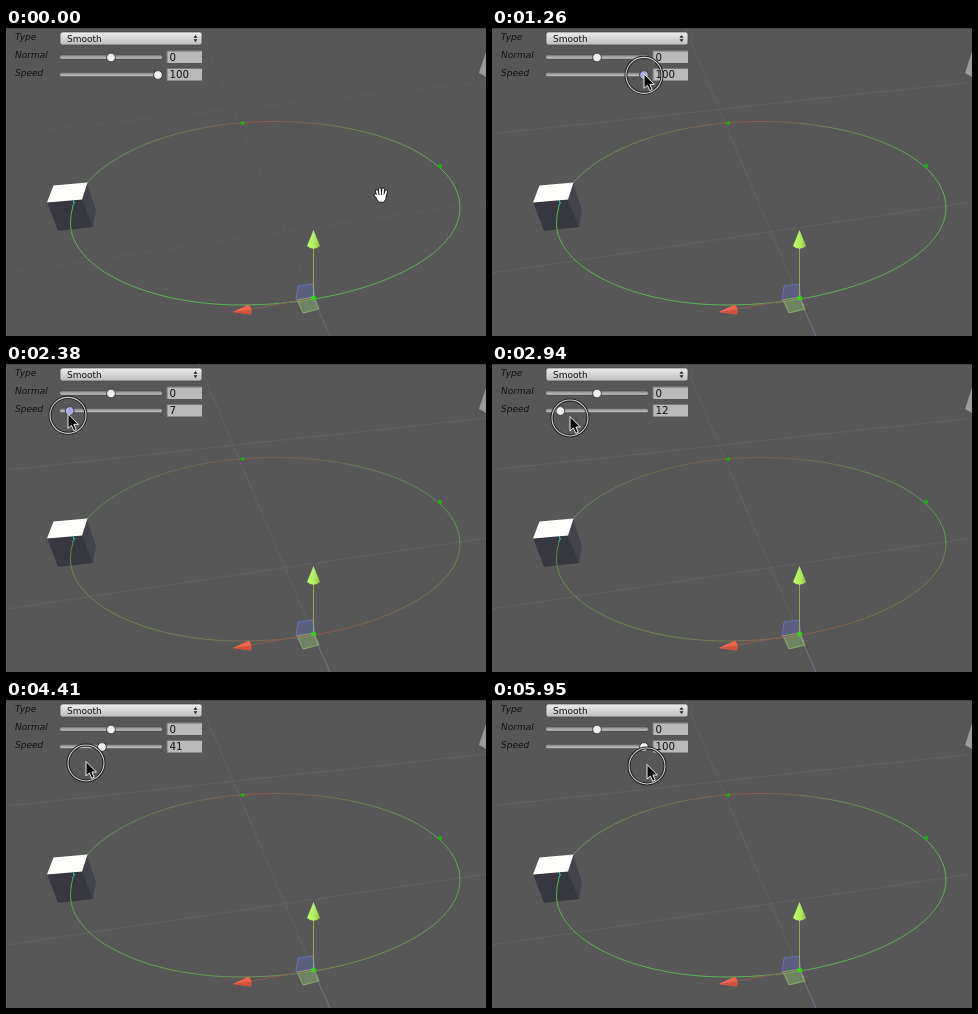
An HTML page for the animation above (6090 ms loop, 480 by 308 pixels).

```html
<!DOCTYPE html>
<html lang="en">
<head>
<meta charset="utf-8">
<title>Spline speed</title>
<style>
html, body { margin: 0; width: 100%; height: 100%; overflow: hidden; background: #575757; }
svg { display: block; width: 480px; height: 308px; }
text { font: 10.3px "DejaVu Sans", sans-serif; fill: #111; }
.label text { font-size: 9px; font-style: italic; }
.menu { font-size: 9px; }
</style>
</head>
<body>
<svg viewBox="0 0 480 308" fill="none">
  <defs>
    <linearGradient id="top" gradientUnits="userSpaceOnUse" x1="64" y1="0" x2="454" y2="0">
      <stop offset="0" stop-color="#62a85a"/>
      <stop offset=".18" stop-color="#698a58"/>
      <stop offset=".33" stop-color="#786b52"/>
      <stop offset=".45" stop-color="#8f5a4e"/>
      <stop offset=".6" stop-color="#82664f"/>
      <stop offset=".72" stop-color="#6f8653"/>
      <stop offset=".9" stop-color="#66a456"/>
      <stop offset="1" stop-color="#64b058"/>
    </linearGradient>
    <linearGradient id="bottom" gradientUnits="userSpaceOnUse" x1="64" y1="0" x2="454" y2="0">
      <stop offset="0"/><stop offset=".3"/><stop offset=".5"/>
      <stop offset=".64"/><stop offset=".78"/><stop offset="1"/>
    </linearGradient>
    <linearGradient id="menu" x2="0" y2="1">
      <stop stop-color="#eee"/><stop offset="1" stop-color="#bcbcbc"/>
    </linearGradient>
    <linearGradient id="groove" x2="0" y2="1">
      <stop stop-color="#777"/><stop offset="1" stop-color="#d0d0d0"/>
    </linearGradient>
    <linearGradient id="cone">
      <stop stop-color="#c4fa78"/><stop offset=".5" stop-color="#b4f062"/><stop offset="1" stop-color="#8fc842"/>
    </linearGradient>
    <g id="track">
      <rect x="53.5" y="-2.3" width="103" height="4.4" rx="2.2" fill="url(#groove)" stroke="#484848" stroke-width=".6"/>
      <path d="M161 -6h35v12h-35z" fill="#b9b9b9"/>
      <path d="M161 6v-12h35" stroke="#777"/>
    </g>
  </defs>

  <rect width="480" height="308" fill="#575757"/>
  <path d="M0 .5H480" stroke="#464646"/>
  <g id="grid" stroke="#656565" stroke-width=".8">
    <path d="M0 106L480 54M0 245L480 174M193 0L307 270"/>
    <path d="M307 270L324 308" stroke="#77839c"/>
  </g>
  <path d="M480 24L473 45L480 49z" fill="#9b9b9b"/>

  <path id="far" d="M64.5 195C64.5 139 156 93.5 268 93.5C373 93.5 454 131 454 180" stroke="url(#top)"/>

  <path d="M41 174L77 171L87 199L52 203z" fill="#37383f"/>
  <path d="M76 172L81 155L90 182L87 199z" fill="#43444b"/>
  <path d="M47.5 157.5L81.5 154.5L76 171.5L41 174.5z" fill="#fdfdfb"/>

  <path id="near" d="M454 180C454 232 352 277 235 277C141 277 64.5 240 64.5 195Q64.5 186 67 178" stroke="url(#bottom)"/>
  <path d="M66.5 178L69 174M67.5 172v3" stroke="#38b8b0"/>
  <g fill="#1eae14">
    <circle cx="236.5" cy="95" r="2"/><circle cx="434" cy="138" r="2.2"/>
  </g>

  <path d="M292 258L307 256L309 270L290 272z" fill="#5c6495" fill-opacity=".65" stroke="#7079b4" stroke-width=".8"/>
  <path d="M291 272L308 269L313 281L297 285z" fill="#83a56e" fill-opacity=".55" stroke="#93b872" stroke-width=".8"/>
  <path d="M245 281L307 270" stroke="#8c6052" stroke-width=".9"/>
  <path d="M307.5 218V270" stroke="#94b258" stroke-width=".9"/>
  <path d="M307.5 202L301 218Q307.5 223.5 314 218z" fill="url(#cone)"/>
  <path d="M226.5 284L243 276.5Q246.5 281 245 286.5z" fill="#f0664a"/>
  <path d="M226.5 284L244.5 281.5L245 286.5z" fill="#cf5239"/>
  <circle cx="307.5" cy="270" r="2.4" fill="#35d321"/>

  <g class="label">
    <text x="9" y="12">Type</text><text x="9" y="30">Normal</text><text x="9" y="48">Speed</text>
  </g>
  <rect x="54" y="4" width="142" height="13" rx="2.5" fill="url(#menu)" stroke="#444" stroke-width=".7"/>
  <text class="menu" x="61" y="13.5">Smooth</text>
  <path d="M187.5 9.7l2-2.7l2 2.7zM187.5 11.3l2 2.7l2-2.7z" fill="#222"/>
  <use href="#track" y="29"/><use href="#track" y="46.5"/>
  <g fill="#eee" stroke="#3c3c3c">
    <circle cx="105" cy="29.5" r="4.4"/>
    <circle id="knob" cy="47" r="4.4"/>
  </g>
  <text x="163.5" y="32.5">0</text>
  <text id="value" x="163.5" y="50"></text>

  <g id="hand" stroke-linecap="round" stroke-linejoin="round">
    <g id="fingers">
      <path d="M-3.2 0L-4.2 -4M-.8 -1L-1.2 -6M1.8 -1L2.2 -5.7M4.1 0L5.2 -3.6M-3 2.5L-5.6 .2"/>
      <path d="M-3 1L4 0L3.5 4L2 6H-1.5L-3.5 3z"/>
    </g>
  </g>
  <g id="arrow">
    <circle r="18" stroke="#1c1c1c" stroke-width="3"/>
    <circle r="18" stroke="#d0d0d0" stroke-width="1.1"/>
    <path d="M0 -1.5V13L3.4 10L5.7 15.3L8.2 14.2L5.9 9H10.4z" fill="#080808" stroke="#eee"/>
  </g>
</svg>
<script>
const LOOP = 6090, STEP = 70, LAST = 5950;
const $ = id => document.getElementById(id);
const clamp = (v, lo, hi) => Math.min(hi, Math.max(lo, v));
const mix = (a, b, k) => a + (b - a) * k;

// Outlined hand: a dark copy below a white one
const fingers = $('fingers'), outline = fingers.cloneNode(true);
outline.removeAttribute('id');
const paint = (g, color, width) => {
  g.setAttribute('stroke', color);
  g.setAttribute('fill', color);
  g.setAttribute('stroke-width', width);
};
paint(outline, '#222', 3.4);
paint(fingers, '#fff', 1.7);
$('hand').prepend(outline);

// Pointer: time, x, y
const route = [
  [0, 375, 167], [210, 300, 125], [490, 150, 52], [630, 114, 42], [700, 113, 42],
  [1120, 152, 47], [1540, 152, 48], [1680, 146.3, 49], [1750, 142, 50], [1820, 134, 52],
  [2240, 66, 52], [2450, 60, 51], [2590, 53, 51], [2800, 58, 52], [2870, 68.4, 53],
  [2940, 78, 54], [3220, 130, 57], [3500, 158, 60], [3780, 161, 61], [4060, 158, 62],
  [4410, 80, 63], [4690, 38, 62], [4830, 37, 62], [5040, 87, 62], [5110, 94.5, 61.5],
  [5390, 140, 62], [5600, 172, 62], [5880, 180, 62], [5950, 155, 66], [LOOP, 155, 66]
];

function pointer(t) {
  const i = Math.max(1, route.findIndex(p => p[0] >= t));
  const [t0, x0, y0] = route[i - 1], [t1, x1, y1] = route[i];
  const k = (t - t0) / (t1 - t0);
  return [mix(x0, x1, k), mix(y0, y1, k)];
}

// The slider trails the pointer by one step
function speedAt(t) {
  if (t < 1330) return 100;
  return Math.round(clamp((pointer(t - STEP)[0] - 57) / 0.95, 0, 100));
}

const green = [94, 178, 84], red = [165, 76, 64];
const heat = [.25, .35, .7, 1, .75, .3];
const stops = document.querySelectorAll('#bottom stop');

function draw(now) {
  const t = Math.min(LAST, Math.floor(now % LOOP / STEP) * STEP);
  const [x, y] = pointer(t), speed = speedAt(t), held = t >= 1260;
  const slow = clamp(1 - speed / 60, 0, 1);

  $('grid').setAttribute('opacity', mix(.5, 1, clamp(t / 630, 0, 1)));
  stops.forEach((stop, i) => {
    const rgb = green.map((g, c) => Math.round(mix(g, red[c], heat[i] * slow)));
    stop.setAttribute('stop-color', `rgb(${rgb})`);
  });
  for (const id of ['far', 'near']) $(id).setAttribute('opacity', 1 - .3 * slow);
  $('knob').setAttribute('cx', 57 + speed * .95);
  $('knob').setAttribute('fill', held && t < 2450 ? '#a9a9e6' : '#eee');
  $('value').textContent = speed;
  for (const id of ['hand', 'arrow']) {
    $(id).setAttribute('transform', `translate(${x} ${y})`);
    $(id).setAttribute('visibility', (id === 'arrow') === held ? 'visible' : 'hidden');
  }
}

const start = performance.now();
function tick() {
  draw(performance.now() - start);
  requestAnimationFrame(tick);
}
tick();
</script>
</body>
</html>
```
